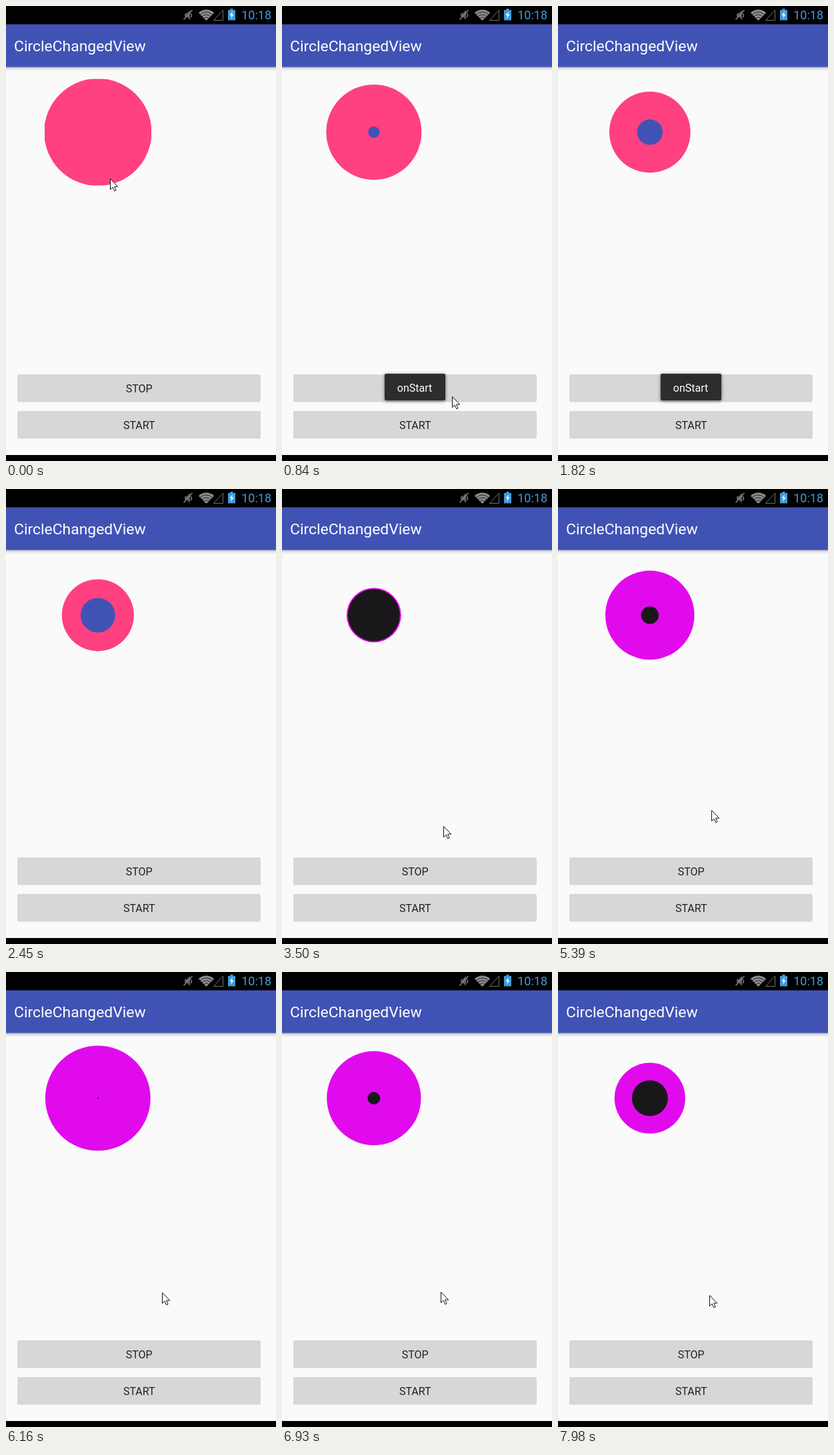
Write an HTML page with a canvas that moves like this. It is 405 px wide and 683 px high and loops after 8000 ms.

```html
<!DOCTYPE html>
<html lang="en">
<head>
<meta charset="utf-8">
<title>CircleChangedView</title>
<style>
  html, body { margin: 0; width: 100%; height: 100%; overflow: hidden; background: #fafafa; }
  canvas { display: block; width: 405px; height: 683px; }
</style>
</head>
<body>
<canvas id="stage" width="405" height="683"></canvas>
<script>
const ctx = document.getElementById('stage').getContext('2d');
const LOOP = 8000, STEP = 70;
const MAX_RADIUS = 80;
const TURN = 3430; // the discs meet here, swap colours and part again

// Key points: [time, value, ...], joined by straight lines.
const RADIUS = [
  [0, 80.6], [2450, 54], [TURN, 40], [5390, 66.8], [6230, 80], [6930, 70.6], [LOOP, 52.7]
];
const POINTER = [
  [0, 156, 259], [210, 205, 622], [840, 255, 586], [1330, 406, 500], [2660, 406, 430],
  [3220, 266, 468], [3500, 242, 506], [5390, 230, 482], [6930, 238, 480], [LOOP, 227, 485]
];

function sample(points, t) {
  const i = points.findIndex(p => p[0] > t);
  const a = points[i - 1], b = points[i];
  const k = (t - a[0]) / (b[0] - a[0]);
  return a.slice(1).map((v, j) => v + (b[j + 1] - v) * k);
}

function rect(x, y, w, h, color) {
  ctx.fillStyle = color;
  ctx.fillRect(x, y, w, h);
}

function roundRect(x, y, w, h, color) {
  ctx.fillStyle = color;
  ctx.beginPath();
  ctx.roundRect(x, y, w, h, 2);
  ctx.fill();
}

function disc(radius, color) {
  ctx.fillStyle = color;
  ctx.beginPath();
  ctx.arc(137.8, 189.4, Math.max(0, radius), 0, 2 * Math.PI);
  ctx.fill();
}

function label(text, x, y, size, color, align = 'center') {
  ctx.font = `${size}px Roboto, sans-serif`;
  ctx.textAlign = align;
  ctx.fillStyle = color;
  ctx.fillText(text, x, y);
}

function shape(d, fill, stroke, width = 1) {
  const path = new Path2D(d);
  if (fill) { ctx.fillStyle = fill; ctx.fill(path); }
  if (stroke) { ctx.strokeStyle = stroke; ctx.lineWidth = width; ctx.stroke(path); }
}

function wifi(x, y) {
  ctx.fillStyle = '#8c8c8c';
  ctx.beginPath();
  ctx.moveTo(x, y);
  ctx.arc(x, y, 16.5, -Math.PI * .75, -Math.PI * .25);
  ctx.fill();
  ctx.strokeStyle = '#222';
  ctx.lineWidth = 1;
  for (let r = 5; r < 16; r += 4) {
    ctx.beginPath();
    ctx.arc(x, y, r, -Math.PI * .76, -Math.PI * .24);
    ctx.stroke();
  }
}

function statusBar() {
  rect(0, 0, 405, 28, '#000');
  shape('M268 11h3l5-5v15l-5-5h-3z', '#5c5c5c');
  shape('M266.5 20.5L279.5 6M277 11q3 3 0 6', null, '#8c8c8c', 1.3);
  wifi(300.5, 22);
  shape('M325.5 6V21.5H311.5z', null, '#707070');
  shape('M336.5 4h4v2h3.5v15.5h-11V6h3.5z', '#3f9bdc');
  shape('M340 8l-4.5 6h2.8l-1.3 5 4.7-6.5h-2.8z', '#fff');
  label('10:18', 398, 20, 18, '#3f9bdc', 'right');
}

function header() {
  const shadow = ctx.createLinearGradient(0, 92, 0, 98);
  shadow.addColorStop(0, '#bcbcbe');
  shadow.addColorStop(.4, '#e6e6e6');
  shadow.addColorStop(1, '#fafafa');
  rect(0, 92, 405, 6, shadow);
  rect(0, 27.5, 405, 64.2, '#4053b4');
  label('CircleChangedView', 12, 68, 22.9, '#fff', 'left');
}

function discs(t) {
  const [radius] = sample(RADIUS, t);
  const [outer, inner] = t < TURN ? ['#ff4081', '#4053b4'] : ['#e10aec', '#19171a'];
  ctx.save();
  ctx.beginPath();
  ctx.rect(58, 109.5, 2 * MAX_RADIUS, 2 * MAX_RADIUS);
  ctx.clip();
  disc(radius, outer);
  disc(MAX_RADIUS - radius, inner);
  ctx.restore();
}

function button(text, y) {
  roundRect(17, y + 1, 365, 41, '#e8e9e9');
  roundRect(17, y, 365, 41, '#d6d7d7');
  label(text, 199.7, y + 27, 16, '#222');
}

function toast(t) {
  const alpha = Math.min(1, (t - 210) / 210, (2310 - t) / 350);
  if (alpha <= 0) return;
  ctx.save();
  ctx.globalAlpha = alpha;
  ctx.shadowColor = 'rgba(0,0,0,.6)';
  ctx.shadowBlur = 5;
  ctx.shadowOffsetY = 1;
  roundRect(154, 552, 91, 40, '#2d2d2d');
  ctx.shadowColor = 'transparent';
  label('onStart', 199, 578.5, 16, '#fff');
  ctx.restore();
}

function pointer(t) {
  const [x, y] = sample(POINTER, t).map(Math.round);
  ctx.save();
  ctx.translate(x + .5, y + .5);
  shape('M0 0V16L3.6 12.6L6.2 18.3L8.6 17.2L6 11.6H11.2z', '#fff', '#111');
  ctx.restore();
}

function draw(t) {
  rect(0, 0, 405, 683, '#fafafa');
  statusBar();
  header();
  rect(0, 674, 405, 9, '#000');
  discs(t);
  button('STOP', 553);
  button('START', 608);
  toast(t);
  pointer(t);
}

function tick() {
  const t = performance.now() % LOOP;
  draw(Math.floor(t / STEP) * STEP);
  requestAnimationFrame(tick);
}
tick();
</script>
</body>
</html>
```
